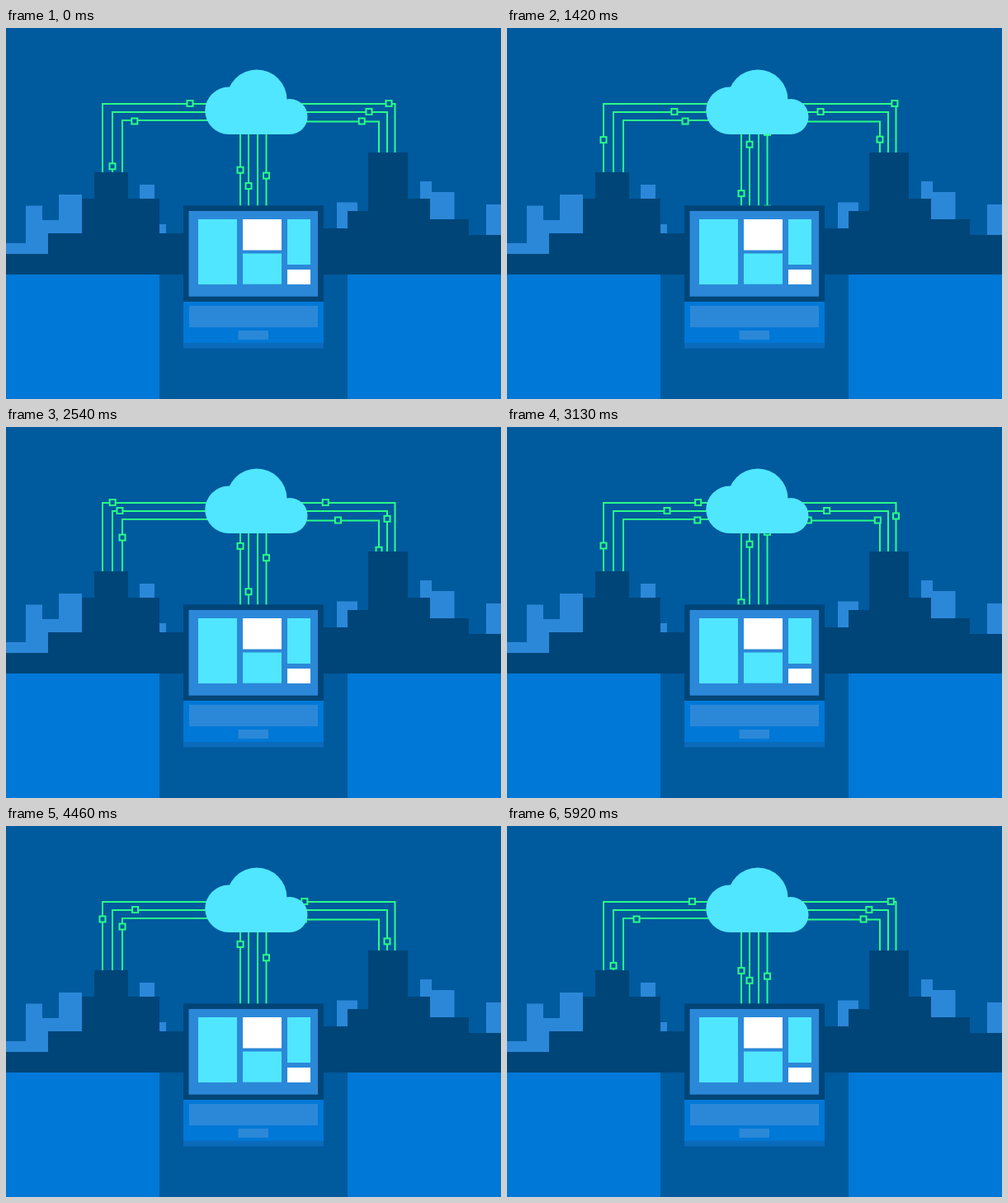
Write an HTML page with a canvas that moves like this. It is 600x450 px and loops after 5.96 s.

```html
<!DOCTYPE html>
<html lang="en">
<head>
<meta charset="utf-8">
<title>Cloud network</title>
<style>
  html, body { margin: 0; width: 100%; height: 100%; overflow: hidden; background: #005a9e; }
  canvas { display: block; width: 600px; height: 450px; }
</style>
</head>
<body>
<canvas id="stage" width="600" height="450"></canvas>
<script>
const ctx = document.getElementById('stage').getContext('2d');
const LOOP = 5960, STEP = 1000 / 24;
const SKY = '#005a9e', DARK = '#004578', MID = '#2b88d8',
      BRIGHT = '#0078d7', CYAN = '#50e6ff', GREEN = '#2bfd87';

// A wire from a rooftop up and across into the cloud. Packets travel between
// just inside the roof and `reach`; each trip is [launch, duration] in ms.
function roofWire(x, roof, y, reach, inbound, bend, trips, dy = -0.5) {
  const rise = roof - y, dir = x < 300 ? 1 : -1;
  return {
    pts: [[x, roof], [x, y], [x + dir * 150, y]],
    span: inbound ? [reach, -6] : [-6, reach],
    at: d => d < rise ? [x, roof - d + dy] : [x + dir * (d - rise), y + dy],
    bend, trips, cycle: 5930
  };
}

// A vertical wire between the cloud and the laptop.
function deskWire(x, down, trips) {
  return {
    pts: [[x, 100], [x, 225]],
    span: down ? [122, 220] : [220, 122],
    at: y => [x, y],
    bend: 0, trips, cycle: 6000
  };
}

const wires = [
  roofWire(117, 175, 92, 214, true, 0, [[1468, 1987], [2965, 2155], [5694, 2076]]),
  roofWire(129, 175, 102, 192, false, 0.35, [[1796, 2053], [3557, 1996], [5825, 2179]]),
  roofWire(141, 175, 112, 174, true, -0.1, [[962, 2100], [2818, 2383], [4840, 1950]], 1),
  roofWire(471.5, 151, 92, 180, false, 0, [[510, 2532], [2613, 1964], [5164, 1966]]),
  roofWire(462, 151, 102, 151, true, -0.1, [[1151, 1900], [2766, 1875], [4902, 1924]]),
  roofWire(452, 151, 113.5, 130, false, 0, [[1081, 2135], [2433, 2039], [4926, 2125]]),
  deskWire(284, false, [[1030, 1960], [2986, 1885], [4805, 2450]]),
  deskWire(294, true, [[1047, 1884], [2792, 1615], [4643, 1910]]),
  deskWire(305, true, []),
  deskWire(315.5, false, [[1402, 1822], [3343, 1815], [4901, 2634]])
];

function box(color, x1, y1, x2, y2) {
  ctx.fillStyle = color;
  ctx.fillRect(x1, y1, x2 - x1, y2 - y1);
}

function disc(x, y, r) {
  ctx.beginPath();
  ctx.arc(x, y, r, 0, Math.PI * 2);
  ctx.fill();
}

// Each step [x, top] runs on to the next step.
function skyline(color, steps) {
  steps.forEach(([x, top], i) => {
    const end = i + 1 < steps.length ? steps[i + 1][0] : 600;
    box(color, x, top, end, 299);
  });
}

function drawWire({ pts }) {
  ctx.beginPath();
  pts.forEach(([x, y]) => ctx.lineTo(x, y));
  ctx.stroke();
}

function drawPackets({ span: [from, to], at, bend, trips, cycle }, t) {
  for (const [launch, duration] of trips) {
    for (const time of [t, t + cycle]) {
      const u = (time - launch) / duration;
      if (u < 0 || u > 1) continue;
      const eased = u + bend * u * (1 - u);
      const [x, y] = at(from + (to - from) * eased);
      ctx.fillStyle = SKY;
      ctx.fillRect(x - 3.5, y - 3.5, 7, 7);
      ctx.strokeRect(x - 3.5, y - 3.5, 7, 7);
    }
  }
}

function drawCloud() {
  ctx.fillStyle = CYAN;
  disc(270, 100.2, 28.7);
  disc(304, 87, 36.5);
  disc(344, 107.5, 21.5);
  ctx.fillRect(270, 95, 74, 34);
}

function drawCity() {
  skyline(MID, [[0, 261], [24, 215.5], [44, 233], [64, 202], [92, 299],
    [162, 190], [180, 299], [186, 238], [194, 299], [401, 211.5], [426, 299],
    [502, 186], [516, 199], [543.5, 299], [582, 214]]);
  skyline(DARK, [[0, 274], [51, 249], [92, 207], [107, 175], [148, 207],
    [186, 249], [385, 243], [414, 222], [439, 151], [487, 207], [514, 232], [561, 251]]);
  box(BRIGHT, 0, 299, 186, 450);
  box(BRIGHT, 414, 299, 600, 450);
}

function drawLaptop() {
  box(DARK, 215, 215.3, 385, 332);
  box(MID, 221.5, 222, 378, 325.7);
  box(CYAN, 233, 232, 280, 311);
  box('#fff', 287, 232, 334, 269.5);
  box(CYAN, 287, 273.5, 334, 310.7);
  box(CYAN, 341, 232, 369, 287);
  box('#fff', 341, 293, 369, 311);
  box(BRIGHT, 215, 332, 385, 382);
  box('#0b6ab9', 215, 382, 385, 388.6);
  box(MID, 222, 337, 378, 363);
  box(MID, 281.5, 367, 318, 378);
}

function draw(t) {
  box(SKY, 0, 0, 600, 450);
  ctx.strokeStyle = GREEN;
  ctx.lineWidth = 2;
  wires.forEach(drawWire);
  wires.forEach(w => drawPackets(w, t));
  drawCloud();
  drawCity();
  drawLaptop();
}

// The picture advances 24 times a second.
function tick() {
  const t = performance.now() % LOOP;
  const step = Math.floor((t + 3.5) / STEP) % 143;
  draw(step * STEP);
  requestAnimationFrame(tick);
}
tick();
</script>
</body>
</html>
```
